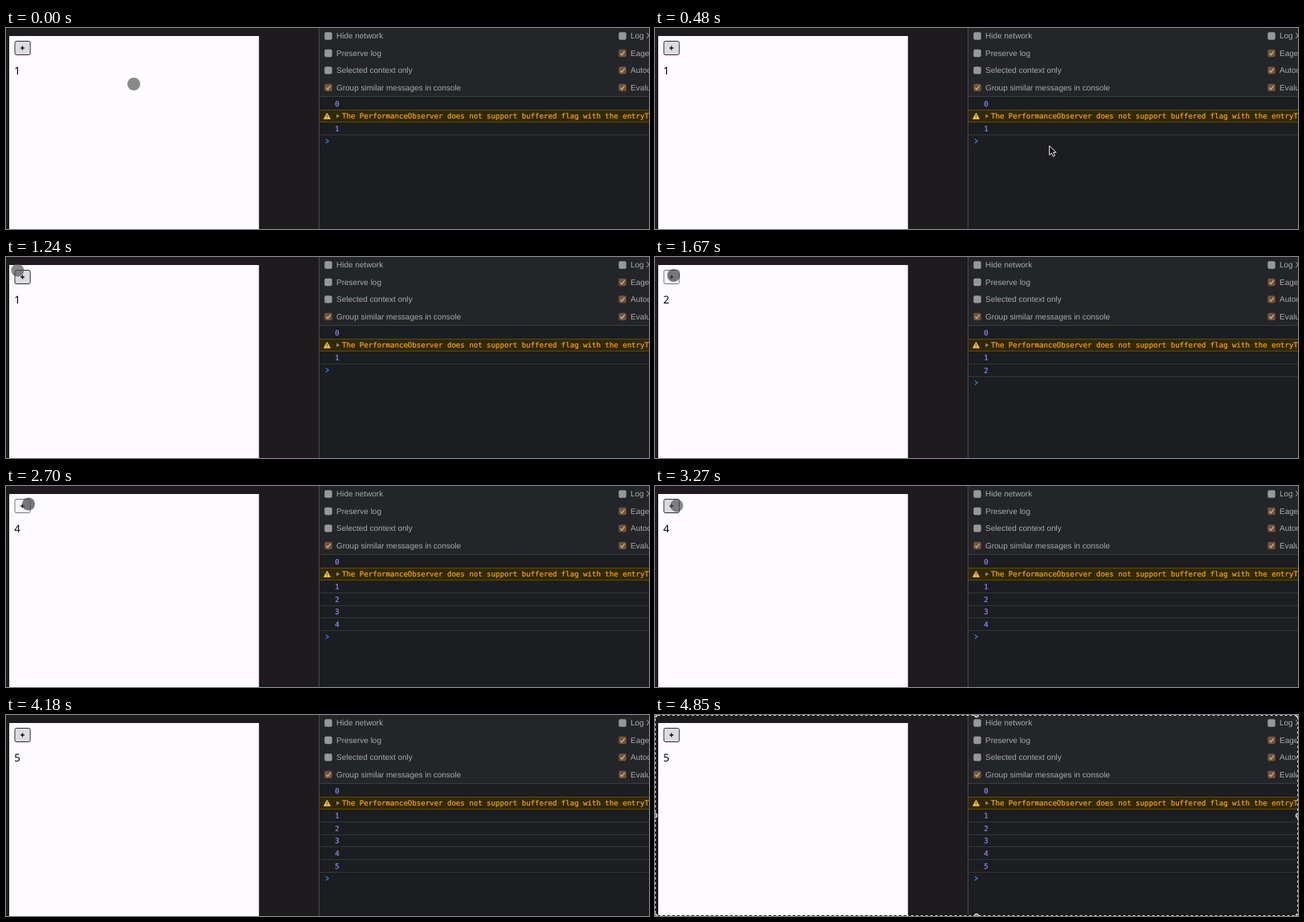
An HTML page that plays this animation: 800 px wide and 251 px high, repeating every 4.88 s.

```html
<!DOCTYPE html>
<html lang="en">
<head>
<meta charset="utf-8">
<title>Counter and console</title>
<style>
html, body { margin: 0; width: 100%; height: 100%; overflow: hidden; background: #1e1b1f; }
svg { display: block; width: 100%; height: 100%; }
text { text-rendering: geometricPrecision; }
.label { font: 9.97px "Liberation Sans", Arial, sans-serif; fill: #a8a9ac; }
.mono { font: 9.07px "DejaVu Sans Mono", monospace; stroke-width: .22; }
.page { font: 13.2px "Noto Sans", sans-serif; fill: #000; }
</style>
</head>
<body>
<svg id="stage" viewBox="0 0 800 251" preserveAspectRatio="none">
  <rect width="800" height="251" fill="#1e1b1f"/>
  <rect x="4" y="10" width="310.7" height="241" fill="#fdfbff"/>
  <rect id="button" x="11" y="16.5" width="19.2" height="17" rx="2"/>
  <path d="M20.5 22.6v4.8M18.1 25h4.8" stroke="#111" stroke-width="1.3"/>
  <text id="count" class="page" x="10.2" y="58.3"></text>

  <rect x="390" width="410" height="86" fill="#242528"/>
  <rect x="390" y="86" width="410" height="165" fill="#1c1d20"/>
  <path d="M389.5 0V251" stroke="#47484c"/>
  <path d="M390 85.5H800" stroke="#3b3c40"/>
  <g id="options"></g>
  <g id="rows"></g>
  <path id="prompt" d="M397.8 -2.5L401.3 0L397.8 2.5" fill="none" stroke="#3576e8" stroke-width="1.2"/>

  <circle id="touch" r="8"/>
  <path id="arrow" d="M0 0V11.6L2.7 9.1L4.6 13.4L6.8 12.4L4.9 8.3H8.3Z" fill="#080808" stroke="#f4f4f4" stroke-width="1" stroke-linejoin="round"/>
  <g id="frame">
    <rect x=".5" y=".5" width="799" height="250" fill="none" stroke="#d8d8d8"/>
    <rect x=".5" y=".5" width="799" height="250" fill="none" stroke="#111" stroke-dasharray="3 3"/>
    <g id="handles" fill="#858585" stroke="#f2f2f2"></g>
  </g>
</svg>
<script>
const LOOP = 4880;
const NS = "http://www.w3.org/2000/svg";
const $ = id => document.getElementById(id);

function add(parent, tag, attrs, text) {
  const el = document.createElementNS(NS, tag);
  set(el, attrs);
  if (text !== undefined) el.textContent = text;
  parent.appendChild(el);
  return el;
}

function set(el, attrs) {
  for (const key in attrs) el.setAttribute(key, attrs[key]);
}

const show = (el, on) => el.setAttribute("visibility", on ? "visible" : "hidden");

// Console settings
function option(x, y, label, checked) {
  const g = $("options");
  add(g, "rect", { x: x + 0.3, y: y - 4.7, width: 9.4, height: 9.4, rx: 1.8, fill: checked ? "#71543a" : "#97989a" });
  if (checked) {
    add(g, "path", {
      d: `M${x + 2.5} ${y + 0.2}l1.9 2.1l3.3 -4.6`,
      fill: "none", stroke: "#cfae8c", "stroke-width": 1.3
    });
  }
  add(g, "text", { x: x + 15, y: y + 3.4, class: "label" }, label);
}

const optionY = i => 10 + i * 21.45;
["Hide network", "Preserve log", "Selected context only", "Group similar messages in console"]
  .forEach((label, i) => option(396, optionY(i), label, i === 3));
["Log XMLHttpRequests", "Eager evaluation", "Autocomplete from history", "Evaluate triggers user activation"]
  .forEach((label, i) => option(762, optionY(i), label, i > 0));

// Console messages
const rowY = i => 94.3 + i * 15.7;
const rule = y => Math.floor(y) + 0.5;

function mono(parent, x, y, color, text) {
  add(parent, "text", { x, y: y + 3.3, class: "mono", fill: color, stroke: color }, text);
}

function number(row, value) {
  const g = add($("rows"), "g", {});
  const y = rowY(row);
  mono(g, 409.3, y, "#9580f5", value);
  if (row) add(g, "path", { d: `M390 ${rule(y + 7.8)}H800`, stroke: "#343539" });
  return g;
}

function warning() {
  const g = $("rows");
  const y = rowY(1);
  add(g, "rect", { x: 390, y: y - 7.8, width: 410, height: 15.7, fill: "#302800" });
  add(g, "path", { d: `M390 ${rule(y - 7.8)}h410M390 ${rule(y + 7.9)}h410`, stroke: "#5c4a05" });
  add(g, "path", {
    d: `M399.5 ${y - 3.6}l3.9 7.1h-7.8z`,
    fill: "#f3bd3c", stroke: "#f3bd3c", "stroke-linejoin": "round"
  });
  add(g, "path", { d: `M399.5 ${y - 1.4}v2.5m0 .8v1`, stroke: "#5e4608", "stroke-width": 0.9 });
  add(g, "path", { d: `M411.2 ${y - 2.4}l4.2 2.5l-4.2 2.5z`, fill: "#8f8a7c" });
  mono(g, 418, y, "#f0a01c",
    "The PerformanceObserver does not support buffered flag with the entryTypes argument.");
}

number(0, 0);
warning();
const logs = [1, 2, 3, 4, 5].map(n => number(n + 1, n));

for (const cx of [0, 400, 800])
  for (const cy of [0, 125.5, 251])
    if (cx !== 400 || cy !== 125.5) add($("handles"), "circle", { cx, cy, r: 2.8 });

// Pointer track: time, x, y
const track = [
  [0, 159, 70], [40, 159, 70], [150, 236, 110], [250, 345, 172], [340, 430, 200],
  [480, 490.7, 147], [600, 484, 146], [700, 390, 108], [790, 190, 40],
  [880, 59.5, -4], [980, 24, -4], [1120, 14, -3], [1220, 14, 15], [1360, 21, 22],
  [1640, 23, 23], [2200, 25, 23], [2700, 28, 22.5], [3300, 27, 24.5],
  [3880, 25.5, 26], [4020, 27, 25], [4200, 90, -16], [LOOP, 90, -16]
];

const slope = (i, k) => (track[i + 1][k] - track[i][k]) / (track[i + 1][0] - track[i][0]);

function tangent(i, k) {
  if (i === 0 || i === track.length - 1) return 0;
  const a = slope(i - 1, k), b = slope(i, k);
  return a * b > 0 ? 2 * a * b / (a + b) : 0;
}

function pointer(t, k) {
  let i = 0;
  while (i < track.length - 2 && track[i + 1][0] <= t) i++;
  const span = track[i + 1][0] - track[i][0];
  const u = (t - track[i][0]) / span, v = 1 - u;
  return v * v * ((1 + 2 * u) * track[i][k] + u * span * tangent(i, k))
    + u * u * ((1 + 2 * v) * track[i + 1][k] - v * span * tangent(i + 1, k));
}

const clicks = [1600, 2110, 2640, 3340];
const HOLD = 135;
const FRAME_AT = 4240;

function draw(t) {
  const count = 1 + clicks.filter(c => t >= c).length;
  const pressed = clicks.some(c => t >= c && t < c + HOLD);
  $("count").textContent = count;
  logs.forEach((g, i) => show(g, i < count));
  $("prompt").setAttribute("transform", `translate(0 ${rowY(count + 2) - 0.2})`);
  set($("button"), { fill: pressed ? "#f8f6fa" : "#dcdbdf", stroke: pressed ? "#77767a" : "#303033" });

  const x = pointer(t, 1), y = pointer(t, 2);
  const inPage = x > 4 && x < 314 && y > 10;
  show($("touch"), inPage);
  show($("arrow"), !inPage);
  set($("touch"), {
    cx: x, cy: y,
    fill: pressed ? "rgba(65,65,65,.7)" : "rgba(75,75,75,.65)"
  });
  $("arrow").setAttribute("transform", `translate(${x} ${y})`);
  show($("frame"), t >= FRAME_AT);
}

const start = performance.now();
function tick() {
  draw((performance.now() - start) % LOOP);
  requestAnimationFrame(tick);
}
draw(0);
requestAnimationFrame(tick);
</script>
</body>
</html>
```
